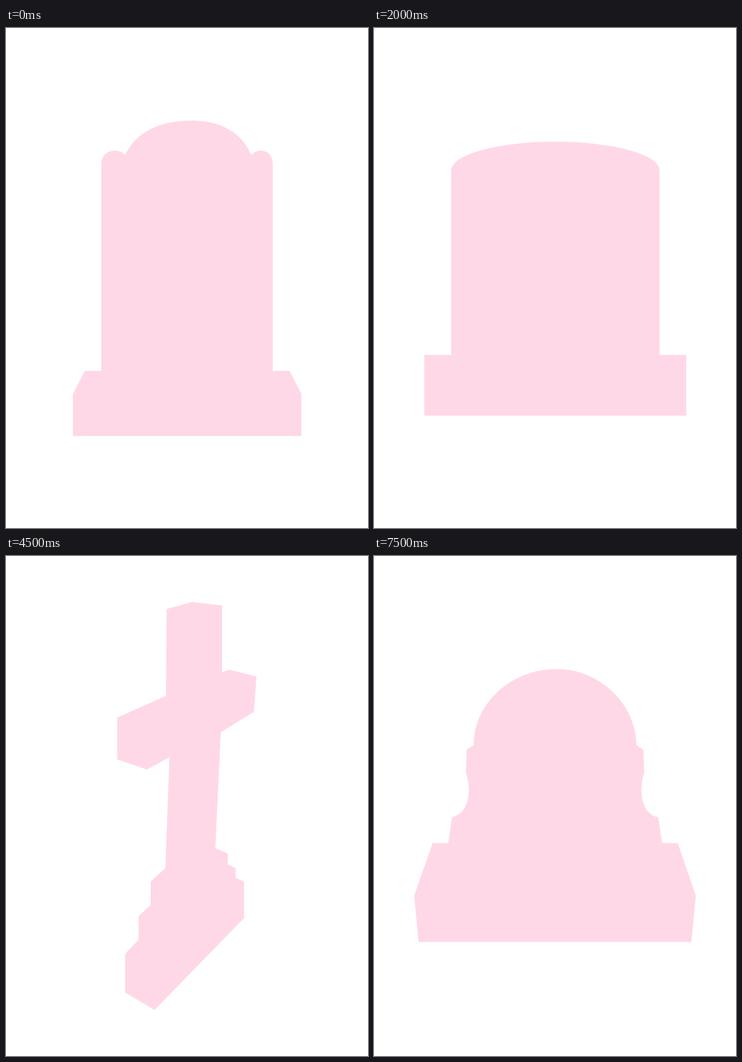
Animation of 568x783 px, one loop 8 s. Source, as an HTML page with a canvas:

```html
<!DOCTYPE html>
<html lang="en">
<head>
<meta charset="utf-8">
<title>Headstones</title>
<style>
html, body { margin: 0; width: 100%; height: 100%; overflow: hidden; background: #fff; }
canvas { display: block; width: 568px; height: 783px; }
</style>
</head>
<body>
<canvas id="stage"></canvas>
<script>
const W = 568, H = 783, HOLD = 500;
const PINK = '#ffd8e8';

const canvas = document.getElementById('stage');
const ctx = canvas.getContext('2d');
const ratio = window.devicePixelRatio || 1;
canvas.width = W * ratio;
canvas.height = H * ratio;

// Symmetric stone: a body with a domed top, standing on an optional foot.
function stone(left, top, right, bottom, { inset = 0, foot = 0, rise = 0, shoulder = 0 }) {
  const a = left + inset, b = right - inset;
  const y = top + rise, rx = (b - a) / 2 - shoulder;
  return new Path2D(
    `M${left} ${bottom}V${bottom - foot}H${a}V${y}h${shoulder}` +
    `A${rx} ${rise} 0 0 1 ${b - shoulder} ${y}H${b}V${bottom - foot}H${right}V${bottom}Z`);
}

const scalloped = new Path2D(`M105 639V573L123.5 537H149.5V213C149.5 200 159 192 171 192
  C177 192 183 194.5 187 199C203 164 240 145 291 145C338 145 370 164 385 199
  C389 195 394 192 400 192C410.5 192 418.5 200 418.5 213V537H445L463.5 573V639Z`);

const wide = new Path2D(`M69 548V501C69 484 80 470 98 461L97.5 212C98 194 108 183 126 181.5
  C142 180.5 158 180.5 172 180.5C180 180.5 183 165 195 165H373
  C385 165 386 180.5 397 180.5C410 180.5 426 180 438 181C458 183 470 192 470.5 212
  L468 461C488 469 499 482 499 501V580L109.5 619.5Z`);

const eared = new Path2D(`M140.5 630.5L127 325C125.5 314 126 306 127 300C130 291 138 286.5 146 286.5
  C157 287 163 294 170.5 306C182 300 184 288 185 275L187.5 241L203.5 237
  C203 189 236 153 287 153C338 153 367 189 367.5 237L381 241L382 275
  C383 293 387 303 398.5 307.5C402 295 412 287 423 287C433 287 441 294 441.5 305
  C442 312 441.5 318 441 325L428.5 630.5Z`);

const cross = new Path2D(`M252 83L291 72L339 77.5V182L350 178L393 188.5L389 244L337 276L328.5 457.5
  L348 466V483L360.5 489V504L373.5 510V567L233 711L187 683.5V623L208 601V564L227 546.5V509.5
  L250 489L256.5 315L221 334.5L174.5 318.5V253L251 219Z`);

const stepped = new Path2D(`M200 169.5L404 160L444 170L427 446L481.5 482.5L478 542L131 624
  L87.5 556L87 492L132.5 483L131.5 259L174 256V229L200 226.5Z`);

const crowned = new Path2D(`M102 635.5V290C147 288 187 259 187 221H213.5C213 181 243 149 282 149
  H295C335 149 363 181 363 221H390C390 259 424 290 466.5 290V634.5Z`);

const domed = new Path2D(`M70 604.5L63 532L92 449.5H116.5L122.5 409C147 404 155 371 144 339
  L145.5 303L156.5 296.5C156 232 214 177 287 177C354 177 411.5 232 412 296.5L422.5 303L424 339
  C414 371 421 405 446 409L452 449.5H476.5L505 532L498 604.5Z`);

const shapes = [
  scalloped,
  stone(139, 109, 429, 674, { inset: 34, foot: 110, rise: 90 }),
  wide,
  stone(110, 138, 458, 647, { inset: 30, foot: 95, rise: 75 }),
  stone(79, 178, 490, 607, { inset: 42, foot: 95, rise: 45 }),
  stone(89, 178, 478, 607, { inset: 36, foot: 90, rise: 60 }),
  eared,
  stone(111, 157, 457, 628, { rise: 95, shoulder: 24 }),
  stone(94, 161, 474, 624, { inset: 38, foot: 95, rise: 60 }),
  cross,
  stone(131, 142, 437, 642, { rise: 100 }),
  stepped,
  stone(81, 168, 487, 616, { inset: 38, foot: 95, rise: 55, shoulder: 20 }),
  crowned,
  stone(54, 186, 514, 597, { inset: 45, foot: 95, rise: 50 }),
  domed
];

const start = performance.now();

function draw(now) {
  const t = Math.max(0, now - start) % (shapes.length * HOLD);
  ctx.setTransform(ratio, 0, 0, ratio, 0, 0);
  ctx.fillStyle = '#fff';
  ctx.fillRect(0, 0, W, H);
  ctx.fillStyle = PINK;
  ctx.fill(shapes[Math.floor(t / HOLD)]);
  requestAnimationFrame(draw);
}
draw(start);
</script>
</body>
</html>
```
